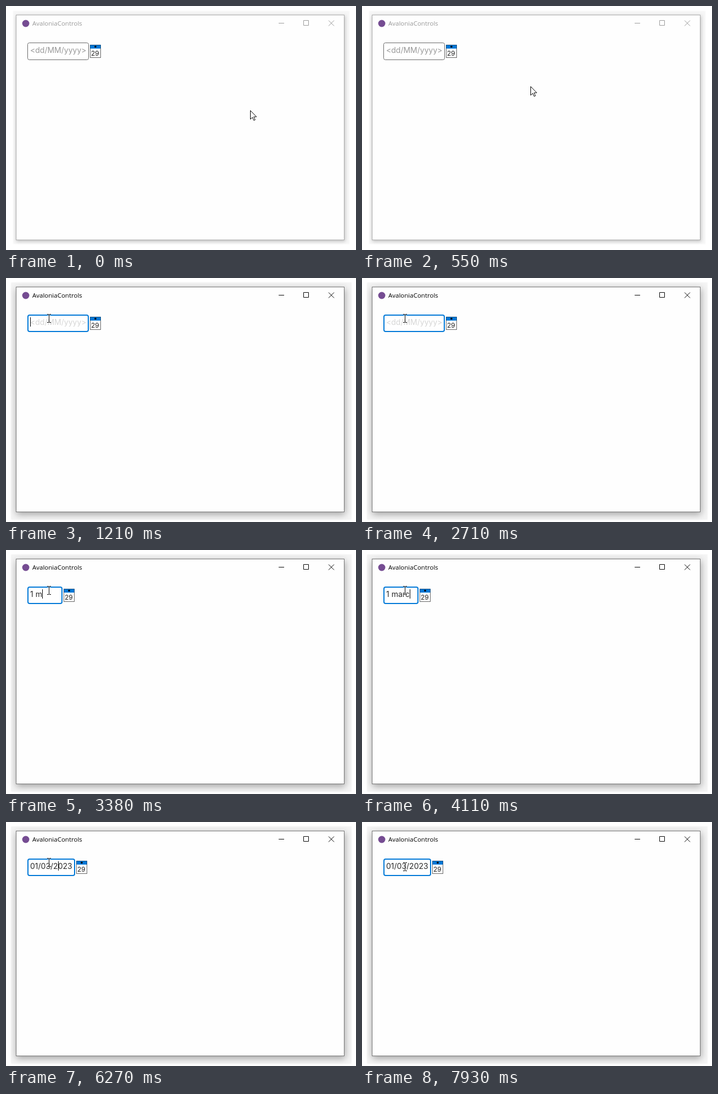
These frames come from a looping animation (638 px wide and 447 px high, 7.99 s). An HTML page:

```html
<!DOCTYPE html>
<html lang="en">
<head>
<meta charset="utf-8">
<title>Date entry</title>
<style>
  html, body { margin: 0; width: 100%; height: 100%; overflow: hidden; background: #fff; }
  .window {
    position: absolute; left: 18px; top: 16px; width: 597px; height: 411px;
    border: 1px solid #aaa; background: #fefefe;
    box-shadow: 1px 2px 6px rgba(0, 0, 0, .24), 2px 0 2px 7px #f6f6f6;
  }
  .active .window {
    border-color: #747474;
    box-shadow: 1px 4px 12px rgba(0, 0, 0, .34), 2px 3px 2px 11px #f4f4f4;
  }
  svg { position: absolute; left: 0; top: 0; }
  .title { font: 11.5px "Open Sans", "Noto Sans", sans-serif; fill: #999; }
  .buttons { fill: none; stroke: #999; }
  .active .title { fill: #000; }
  .active .buttons { stroke: #000; }
  .entry { font: 14px Inter, sans-serif; fill: #2a2a2a; }
  .day { font: 12px Inter, sans-serif; fill: #222; }
  .box { fill: #fff; stroke: #666; }
  .hint .entry { fill: #999; }
  .hover .box { stroke: #333; }
  .hover .entry { fill: #c2c2c2; }
  .active .box { stroke: #0078d7; stroke-width: 2; }
  .active .hint .entry { fill: #d6d6d6; }
</style>
</head>
<body>
<div id="stage">
  <div class="window"></div>
  <svg width="638" height="447" viewBox="0 0 638 447">
    <circle cx="36" cy="32" r="6.5" fill="#754c92"/>
    <text class="title" x="48" y="36">AvaloniaControls</text>
    <g class="buttons">
      <path d="M497 31.5h10M542.5 26.5h9v9h-9z"/>
      <path d="M588 26.5l10 10M598 26.5l-10 10"/>
    </g>
    <g id="field">
      <rect class="box" id="box" x="39.5" y="67.5" height="31" rx="3"/>
      <text class="entry" id="entry" x="44" y="86" xml:space="preserve"></text>
      <rect id="caret" y="72" width="1" height="17"/>
    </g>
    <g id="calendar">
      <rect x=".5" y="71.5" width="19" height="23" fill="#fff" stroke="#666"/>
      <path d="M0 71h20v7H0z" fill="#0078d7"/>
      <path d="M.5 78V71.5h19V78" fill="none" stroke="#174f80"/>
      <circle cx="10" cy="74.5" r="1.8"/>
      <text class="day" x="2" y="91">29</text>
    </g>
    <path id="arrow" d="M.5.5v16l3.7-3.5 2.6 5.6 2.4-1.1-2.6-5.5h5z" fill="#fff" stroke="#000"/>
    <g id="beam" fill="none">
      <path d="M0 .5h3M4 .5h3M3.5 1v14M0 15.5h3M4 15.5h3" stroke="#fff" stroke-width="2.4" opacity=".7"/>
      <path d="M0 .5h3M4 .5h3M3.5 1v14M0 15.5h3M4 15.5h3" stroke="#000"/>
    </g>
  </svg>
</div>
<script>
const LOOP = 7990;
const HINT = '<dd/MM/yyyy>';
const DATE = '01/03/2023';
const FOCUS = 1210;

// [time, text, caret x]
const edits = [
  [0, HINT, 44], [2830, '1', 50], [2940, '1 ', 54], [3380, '1 m', 66],
  [3560, '1 ma', 74], [3800, '1 mar', 79], [4110, '1 marc', 87],
  [4290, '1 march', 95], [5600, DATE, 95]
];
// [time, caret visible]
const blinks = [
  [0, 0], [FOCUS, 1], [1750, 0], [2200, 1], [2710, 0], [2830, 1], [4780, 0],
  [5290, 1], [5780, 0], [6270, 1], [6770, 0], [7270, 1], [7760, 0]
];
// [time, vertical shift of the text pointer]
const nudges = [[0, 0], [7850, 4], [LOOP - 60, 8]];

const $ = id => document.getElementById(id);
const at = (track, t) => track.findLast(step => step[0] <= t);
const show = (el, on) => el.setAttribute('visibility', on ? 'visible' : 'hidden');
const move = (el, x, y) => el.setAttribute('transform', `translate(${x} ${y})`);

function pointer(t) {
  const step = Math.min(12, Math.max(0, Math.floor((t - 310) / 59) + 1));
  const p = step / 12;
  const ease = p * p * (3 - 2 * p);
  return [Math.round(445 - 367 * ease), Math.round(191 - 117 * ease)];
}

function draw(t) {
  const [x, y] = pointer(t);
  const inside = x < 151 && y < 99;
  const focused = t >= FOCUS;
  const [, text, caretX] = at(edits, t);
  const width = text === HINT ? 112 : text === DATE ? 87 : 64;
  const inset = focused ? 1 : 0.5;

  $('stage').classList.toggle('active', focused);
  $('field').classList.toggle('hint', text === HINT);
  $('field').classList.toggle('hover', inside && !focused);

  $('box').setAttribute('x', 39 + inset);
  $('box').setAttribute('y', 67 + inset);
  $('box').setAttribute('width', width - 2 * inset);
  $('box').setAttribute('height', 32 - 2 * inset);
  $('entry').textContent = text;
  $('caret').setAttribute('x', caretX);
  show($('caret'), at(blinks, t)[1]);
  move($('calendar'), 41 + width, 0);

  show($('arrow'), !inside);
  show($('beam'), inside);
  move($('arrow'), x, y);
  move($('beam'), x - 3, y - 8 + at(nudges, t)[1]);
}

function tick() {
  draw(performance.now() % LOOP);
  requestAnimationFrame(tick);
}
tick();
</script>
</body>
</html>
```
